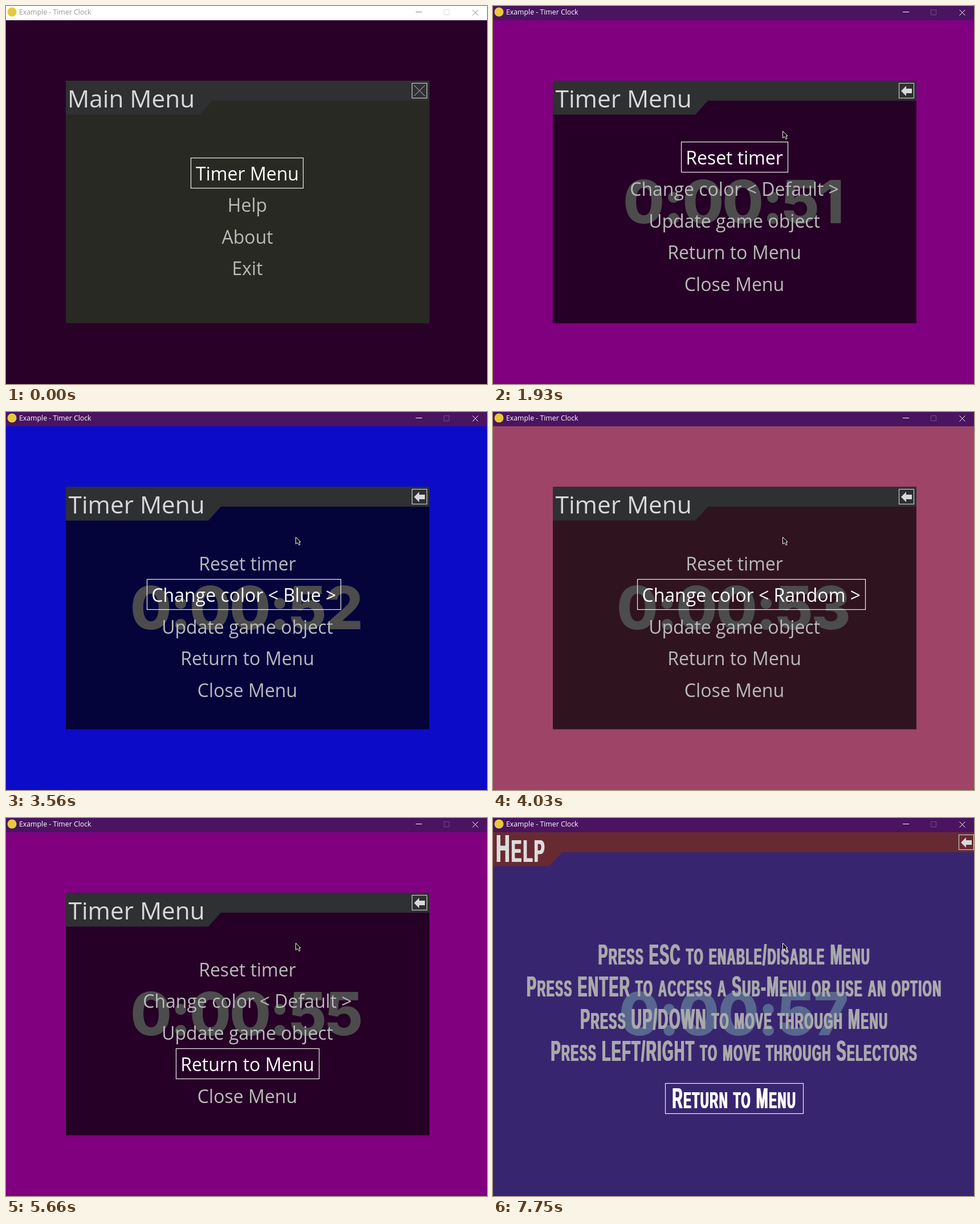
Recreate the animation shown at these times as an HTML page with a canvas. Size 844 by 663 pixels, loop 8000 ms.

```html
<!DOCTYPE html>
<html>
<head>
<meta charset="utf-8">
<style>
html, body { margin: 0; width: 100%; height: 100%; overflow: hidden; background: #280028; }
canvas { display: block; }
</style>
</head>
<body>
<canvas id="stage" width="844" height="663"></canvas>
<script>
const ctx = document.getElementById('stage').getContext('2d');
const LOOP = 8000, CX = 423.5;
const SANS = '"Open Sans", sans-serif';
const CONDENSE = 0.5, TRACKING = 0.066, SMALL = 0.82;
const DIM = '#bababa', HEAD = '#d8d8d8';

function rect(x, y, w, h, color) {
  ctx.fillStyle = color;
  ctx.fillRect(x, y, w, h);
}

function frame(x, y, w, h, color) {
  ctx.strokeStyle = color;
  ctx.lineWidth = 1.2;
  ctx.strokeRect(Math.round(x) + 0.5, Math.round(y) + 0.5, Math.round(w), Math.round(h));
}

function poly(points, color) {
  ctx.fillStyle = color;
  ctx.beginPath();
  points.forEach(([x, y]) => ctx.lineTo(x, y));
  ctx.closePath();
  ctx.fill();
}

function lines(segments, color, width = 1) {
  ctx.strokeStyle = color;
  ctx.lineWidth = width;
  ctx.beginPath();
  for (const [x1, y1, x2, y2] of segments) {
    ctx.moveTo(x1, y1);
    ctx.lineTo(x2, y2);
  }
  ctx.stroke();
}

function text(str, x, y, font, color) {
  ctx.font = font;
  ctx.fillStyle = color;
  ctx.fillText(str, x, y);
}

function widthOf(str, font) {
  ctx.font = font;
  return ctx.measureText(str).width;
}

// Condensed small-caps text; returns its width and draws when a colour is given
function smallCaps(str, x, y, size, color) {
  let dx = 0;
  ctx.letterSpacing = size * TRACKING + 'px';
  for (const part of str.match(/[a-z]+|[^a-z]+/g)) {
    const px = /[a-z]/.test(part) ? size * SMALL : size;
    const font = `bold ${px}px "Liberation Sans", sans-serif`;
    const caps = part.toUpperCase();
    if (color) {
      for (const bold of [-0.8, 0, 0.8]) {
        ctx.save();
        ctx.translate(x + dx + bold, y);
        ctx.scale(CONDENSE, 1);
        text(caps, 0, 0, font, color);
        ctx.restore();
      }
    }
    dx += widthOf(caps, font) * CONDENSE;
  }
  ctx.letterSpacing = '0px';
  return dx;
}

function windowBar(active) {
  rect(0, 0, 844, 25, active ? '#4a1460' : '#ffffff');
  ctx.fillStyle = '#e8c93a';
  ctx.beginPath();
  ctx.arc(10.5, 10.5, 8, 0, 7);
  ctx.fill();
  text('Example - Timer Clock', 23, 15, '12.3px ' + SANS, active ? '#ffffff' : '#979797');
  const ink = active ? '#ffffff' : '#808080';
  lines([[719, 10.5, 730, 10.5]], ink);
  frame(768, 6, 9, 9, active ? '#6c4580' : '#e2e2e2');
  lines([[818.5, 6.5, 828.5, 16.5], [828.5, 6.5, 818.5, 16.5]], ink);
}

function header(x, y, w, tab, color) {
  poly([[x, y], [x + w, y], [x + w, y + 35], [tab + 22, y + 35], [tab, y + 59.5], [x, y + 59.5]], color);
}

function cornerButton(x, y, back) {
  frame(x, y, 26, 26, '#c8c8c8');
  if (back) {
    poly([[4, 14], [13, 5], [13, 10], [23, 10], [23, 18], [13, 18], [13, 23]]
      .map(([px, py]) => [x + px, y + py]), HEAD);
  } else {
    lines([[x + 4, y + 4, x + 23, y + 23], [x + 23, y + 4, x + 4, y + 23]], '#c8c8c8');
  }
}

function clock(seconds, color) {
  ctx.letterSpacing = '-2.8px';
  ctx.textAlign = 'center';
  text('0:00:' + seconds, 421, 380.5, '800 105px Inter, sans-serif', color);
  ctx.textAlign = 'left';
  ctx.letterSpacing = '0px';
}

// A widget may keep the left edge of its former label for a moment
function widget(label, base, selected, anchor = label) {
  const font = '32px ' + SANS;
  const x = CX - widthOf(anchor, font) / 2;
  text(label, x, base, font, selected ? '#ffffff' : DIM);
  if (selected) frame(x - 8.5, base - 40, widthOf(label, font) + 16, 53, '#f0f0f0');
}

function menu(title, tab, back) {
  header(105, 131, 638, tab, '#2f3032');
  text(title, back ? 109.5 : 108, 178, '42.3px ' + SANS, HEAD);
  cornerButton(712, 135, back);
}

function mainMenu(selected) {
  rect(0, 25, 844, 638, '#280028');
  rect(105, 131, 638, 425.5, '#282923');
  menu('Main Menu', 340, false);
  ['Timer Menu', 'Help', 'About', 'Exit'].forEach((label, i) =>
    widget(label, 306 + Math.round(i * 55.4), i === selected));
}

const COLORS = [
  { at: 0, name: 'Default', bg: '#800080' },
  { at: 3020, name: 'Black', bg: '#000000' },
  { at: 3560, name: 'Blue', bg: '#0c0cc8', settle: 80 },
  { at: 4030, name: 'Random', bg: '#9e4467', settle: 80 },
  { at: 4490, name: 'Default', bg: '#800080' }
];

function timerMenu(t, seconds) {
  const n = COLORS.findLastIndex(c => t >= c.at);
  const color = COLORS[n];
  const selector = c => `Change color < ${c.name} >`;
  const lagging = n > 0 && t < color.at + (color.settle || 0);
  const selected = [2550, 4960, 5190].filter(at => t >= at).length;
  rect(0, 25, 844, 638, color.bg);
  clock(seconds, '#ffffff');
  rect(105, 131, 638, 425.5, 'rgba(0,0,0,0.7)');
  menu('Timer Menu', 355, true);
  ['Reset timer', selector(color), 'Update game object', 'Return to Menu', 'Close Menu'].forEach((label, i) =>
    widget(label, 278 + Math.round(i * 55.4), i === selected,
      i === 1 && lagging ? selector(COLORS[n - 1]) : label));
}

function helpMenu(seconds) {
  rect(0, 25, 844, 638, '#38256f');
  clock(seconds, '#58678f');
  header(0, 25, 844, 99, '#682a32');
  smallCaps('Help', 5, 77, 68, '#dcdcdc');
  cornerButton(817, 29, true);
  [
    'Press ESC to enable/disable Menu',
    'Press ENTER to access a Sub-Menu or use an option',
    'Press UP/DOWN to move through Menu',
    'Press LEFT/RIGHT to move through Selectors',
    'Return to Menu'
  ].forEach((label, i) => {
    const x = CX - smallCaps(label, 0, 0, 50) / 2;
    smallCaps(label, x, i < 4 ? 257 + i * 56.4 : 509, 50, i < 4 ? '#a9a9ab' : '#ffffff');
  });
  frame(302, 465, 242, 53, '#f0f0f0');
}

// Progress through eight even steps, 0 to 1
const stepped = (t, from) => Math.min(7, Math.max(0, Math.floor((t - from) / 77))) / 7;

function pointer(t) {
  if (t < 140) return;
  let x, y;
  if (t < 830) {
    const u = stepped(t, 140), v = 1 - u;
    const curve = (a, b, c) => a * v * v + 2 * b * u * v + c * u * u;
    x = curve(625, 290, 430);
    y = curve(551, 30, 303);
  } else {
    const u = (stepped(t, 830) * 7 + 1) / 8, e = u * u * (3 - 2 * u);
    x = 430 + 78 * e;
    y = 303 - 84 * e;
  }
  x = Math.round(x) + 0.5;
  y = Math.round(y) + 0.5;
  poly([[0, 0], [0, 12], [3, 9.5], [5.5, 14], [7.5, 13], [5.5, 8.5], [8.5, 8.5]]
    .map(([px, py]) => [x + px, y + py]), '#000000');
  ctx.strokeStyle = '#ffffff';
  ctx.lineWidth = 1;
  ctx.stroke();
}

function draw(now) {
  const t = now % LOOP;
  const seconds = 51 + [2630, 3640, 4650, 5660, 6680, 7750].filter(at => t >= at).length;
  if (t < 1930) mainMenu(0);
  else if (t < 6040) timerMenu(t, seconds);
  else if (t < 6910) mainMenu(t < 6600 ? 0 : 1);
  else helpMenu(seconds);
  windowBar(t >= 1220);
  pointer(t);
  requestAnimationFrame(draw);
}
requestAnimationFrame(draw);
</script>
</body>
</html>
```
